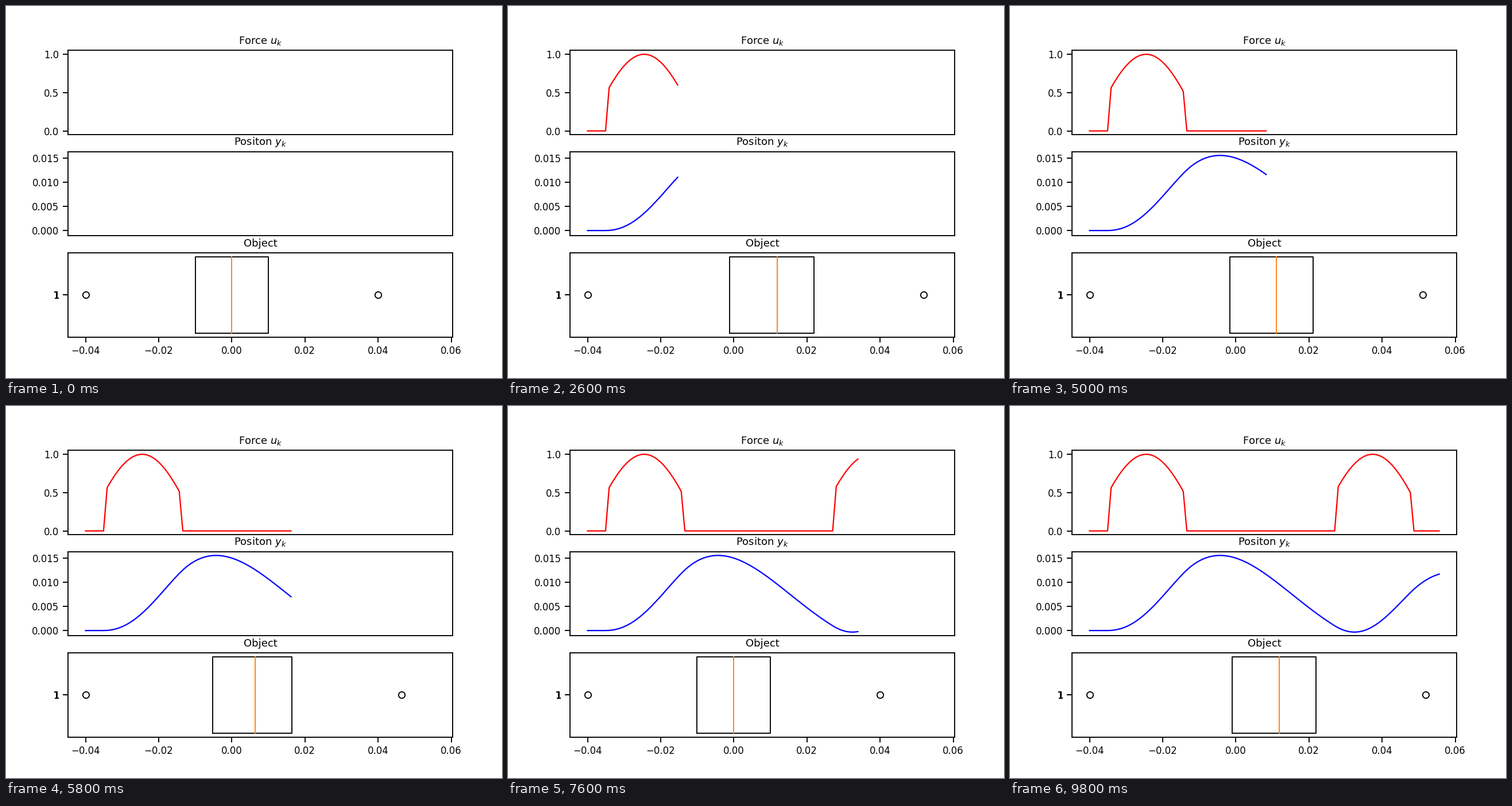
Recreate the animation shown at these times as a matplotlib script. Size 864x648 px, loop 10000 ms.

```python
import numpy as np
import matplotlib.pyplot as plt
from matplotlib.animation import FuncAnimation

FRAMES, INTERVAL = 50, 200
STEPS = 2 * FRAMES - 1
DT = 0.1
MASS, DAMPING, STIFFNESS = 100.0, 50.0, 40.0

plt.rcParams.update({
    "font.family": "DejaVu Sans",
    "axes.linewidth": 1.0,
    "axes.titlesize": 9.6,
    "axes.titlepad": 6,
    "lines.linewidth": 1.2,
})


def zero_order_hold():
    """Discrete state matrices of the mass-spring-damper."""
    a = np.zeros((3, 3))
    a[0, 1] = 1
    a[1] = [-STIFFNESS / MASS, -DAMPING / MASS, 1 / MASS]
    total = term = np.eye(3)
    for n in range(1, 15):
        term = term @ a * DT / n
        total = total + term
    return total[:2, :2], total[:2, 2]


def simulate(force):
    a, b = zero_order_hold()
    state = np.zeros(2)
    out = []
    for u in force:
        state = a @ state + b * u
        out.append(state[0])
    return np.array(out)


def padded(low, high):
    margin = 0.05 * (high - low)
    return low - margin, high + margin


wave = np.sin(DT * np.arange(STEPS))
force = np.where(wave > 0.5, wave, 0)
pos = simulate(force)
x_max = 0.04 + pos.max()
x = np.linspace(-0.04, x_max, STEPS - 1)

# The layout is a hair larger than the whole-pixel canvas.
GROW = 648.4 / 648
fig, axes = plt.subplots(3, 1, figsize=(6.4, 4.8), dpi=135)
fig.subplots_adjust(left=0.125 * GROW, right=0.9 * GROW,
                    bottom=0.11 * GROW, top=0.88 * GROW, hspace=0.2)
ax_u, ax_y, ax_obj = axes

titles = ("Force $u_k$", "Positon $y_k$", "Object")
for ax, title in zip(axes, titles):
    ax.set_title(title)
    ax.set_xlim(padded(-0.04, x_max))
    ax.tick_params(length=4.8, width=1.0, pad=3.5, labelsize=8.8)
for ax in (ax_u, ax_y):
    ax.set_xticks([])

ax_u.set_ylim(padded(0, force.max()))
ax_u.set_yticks([0, 0.5, 1], ["0.0", "0.5", "1.0"])
ax_y.set_ylim(padded(pos.min(), pos.max()))
ax_y.set_yticks([0, 0.005, 0.01, 0.015])

# Stacked ticks give the bold mark beside the box.
LOW, HIGH = 0.925, 1.075
ax_obj.set_ylim(padded(LOW, HIGH))
ax_obj.set_xticks(np.arange(-2, 4) * 0.02)
ax_obj.set_yticks([1] * 10, ["1"] * 10)

u_line, = ax_u.plot([], [], color="red")
y_line, = ax_y.plot([], [], color="blue")
box, = ax_obj.plot([], [], color="black", lw=1)
median, = ax_obj.plot([], [], color="#ff7f0e", lw=1)
ends, = ax_obj.plot([], [], "o", ms=6, mew=1, mfc="none", mec="black")


def draw(k):
    n = 2 * k
    u_line.set_data(x[:n], force[:n])
    y_line.set_data(x[:n], pos[:n])
    y = pos[n]
    left, right = 0.75 * y - 0.01, y + 0.01
    box.set_data([left, right, right, left, left],
                 [LOW, LOW, HIGH, HIGH, LOW])
    median.set_data([y, y], [LOW, HIGH])
    ends.set_data([-0.04, 0.04 + y], [1, 1])
    return u_line, y_line, box, median, ends


anim = FuncAnimation(fig, draw, frames=FRAMES, interval=INTERVAL,
                     init_func=lambda: draw(0), repeat=True, repeat_delay=0)
plt.show()
```
